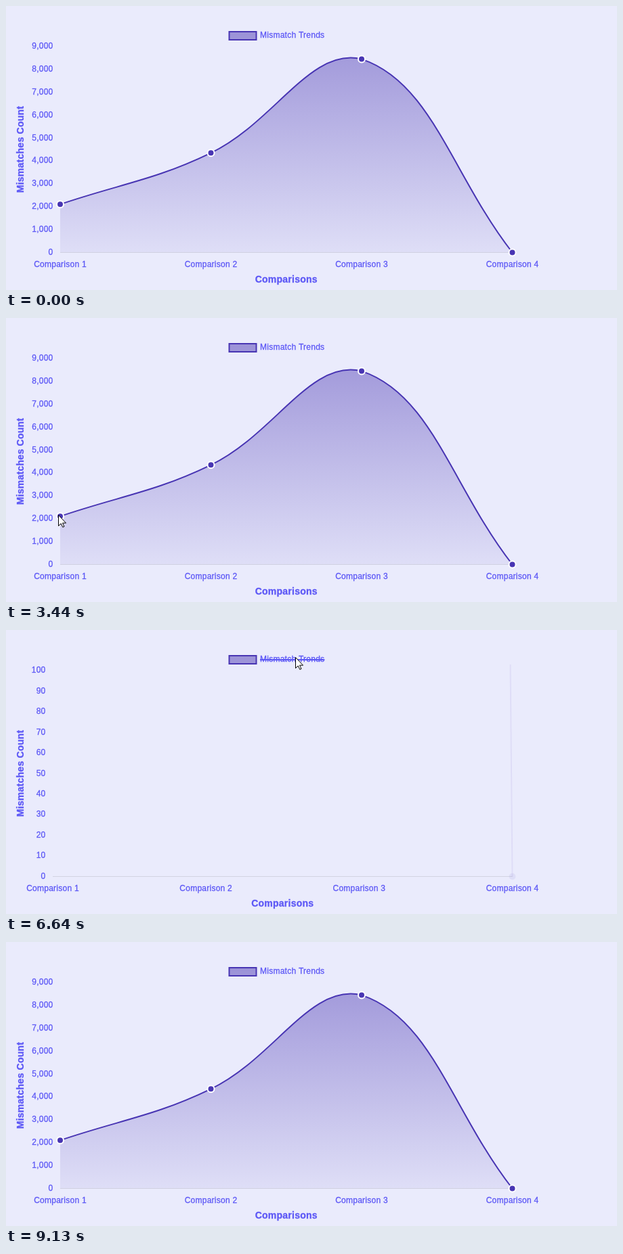
Recreate the animation shown at these times as an HTML page with a canvas. Size 902 by 420 pixels, loop 9740 ms.

```html
<!DOCTYPE html>
<html lang="en">
<head>
<meta charset="utf-8">
<title>Mismatch Trends</title>
<style>
  html, body { margin: 0; width: 100%; height: 100%; overflow: hidden; background: #eaebfc; }
  canvas { display: block; }
</style>
</head>
<body>
<canvas id="stage" width="902" height="420"></canvas>
<script>
const ctx = document.getElementById('stage').getContext('2d');
const LOOP = 9740;
const BACKGROUND = '#eaebfc', INK = '#5d58f6', LINE = '#4835b3';
const TOP = 60, BOTTOM = 364.5, RIGHT = 747.5;
const SERIES = 'Mismatch Trends';
const VALUES = [2105, 4350, 8450, 0];
const HIDE_AT = 6155, SHOW_AT = 7063, TOGGLE_MS = 1000;

const SHOWN = { left: 80, max: 9000, step: 1000 };
const HIDDEN = { left: 69, max: 100, step: 10 };

// Point index, time the hover starts, time it ends
const HOVERS = [[2, 1050, 1710], [1, 2490, 3000], [0, 3567, 3926], [3, 4915, 5476]];

// Pointer visits as [time, x, y]; it is off stage between the tracks
const TRACKS = [
  [[120, 794, 314], [560, 640, 175], [820, 545, 92], [1000, 521, 77], [1650, 521, 77],
   [2080, 331, 205], [2300, 301, 217], [2940, 301, 217], [3200, 165, 262], [3410, 77, 291],
   [3880, 77, 291], [4060, 713, 294], [4250, 786, 376], [4640, 743, 369], [5440, 743, 369],
   [5620, 545, 214], [5840, 427, 52], [5910, 427, 40], [8120, 427, 40],
   [8180, 440, 37], [8300, 457, 33]],
  [[8710, 600, 23], [8850, 680, 140], [9000, 800, 310], [9120, 819, 420]]
];

const clamp = (v, lo = 0, hi = 1) => Math.min(hi, Math.max(lo, v));
const lerp = (a, b, k) => a + (b - a) * k;
const easeOut = u => 1 - (1 - clamp(u)) ** 4;
const format = n => n.toLocaleString('en-US');

const fill = ctx.createLinearGradient(0, 20, 0, 420);
fill.addColorStop(0, 'rgba(70,50,176,.5)');
fill.addColorStop(1, 'rgba(70,50,176,0)');

function setFont(font) {
  ctx.font = `${font} "Liberation Sans", Arial, sans-serif`;
  ctx.letterSpacing = '0.25px';
}

// A hairline stroke gives the letters a slightly heavier weight
function text(string, x, y, align = 'center', font = '12px', color = INK) {
  setFont(font);
  ctx.textAlign = align;
  ctx.textBaseline = 'middle';
  ctx.fillStyle = ctx.strokeStyle = color;
  ctx.lineWidth = 0.3;
  ctx.fillText(string, x, y);
  ctx.strokeText(string, x, y);
  return ctx.measureText(string).width;
}

const columnX = (scale, i) => lerp(scale.left, RIGHT, i / 3);
const place = (scale, i) => ({
  x: columnX(scale, i),
  y: BOTTOM - VALUES[i] / scale.max * (BOTTOM - TOP)
});

function drawAxes(scale, hidden) {
  ctx.fillStyle = 'rgba(0,0,0,.1)';
  ctx.fillRect(scale.left, 364, RIGHT - scale.left, 1);
  for (let v = 0; v <= scale.max; v += scale.step) {
    text(format(v), scale.left - 10.5, lerp(BOTTOM, TOP, v / scale.max), 'right');
  }
  VALUES.forEach((_, i) => text(`Comparison ${i + 1}`, columnX(scale, i), 382.7));
  text('Comparisons', (scale.left + RIGHT) / 2, 405.5, 'center', 'bold 14px');
  ctx.save();
  ctx.translate(22.5, 212);
  ctx.rotate(-Math.PI / 2);
  text('Mismatches Count', 0, 0, 'center', 'bold 14px');
  ctx.restore();

  ctx.fillStyle = fill;
  ctx.fillRect(329.5, 38, 40, 12);
  ctx.strokeStyle = LINE;
  ctx.lineWidth = 2;
  ctx.strokeRect(329.5, 38, 40, 12);
  const width = text(SERIES, 375, 43.5, 'left');
  if (hidden) ctx.fillRect(375, 43, width, 2);
}

// Control points of a cardinal spline, kept inside the plot where neighbours are inside
function addControls(points) {
  const inside = p => p && p.y >= TOP - 0.5;
  points.forEach((p, i) => {
    const prev = points[i - 1], next = points[i + 1];
    const a = prev || p, b = next || p;
    const before = Math.hypot(p.x - a.x, p.y - a.y), after = Math.hypot(b.x - p.x, b.y - p.y);
    const control = (share, neighbour) => {
      const k = 0.4 * share / (before + after);
      const y = p.y + k * (b.y - a.y);
      return {
        x: p.x + k * (b.x - a.x),
        y: inside(p) && inside(neighbour) ? clamp(y, TOP, BOTTOM) : y
      };
    };
    p.into = control(-before, prev);
    p.out = control(after, next);
  });
}

function traceCurve(points) {
  points.forEach((p, i) => {
    if (!i) return ctx.lineTo(p.x, p.y);
    const from = points[i - 1].out;
    ctx.bezierCurveTo(from.x, from.y, p.into.x, p.into.y, p.x, p.y);
  });
}

function clipPlot(scale, margin, draw) {
  ctx.save();
  ctx.beginPath();
  ctx.rect(scale.left - margin, TOP - margin,
    RIGHT - scale.left + 2 * margin, BOTTOM - TOP + 2 * margin);
  ctx.clip();
  draw();
  ctx.restore();
}

function hoverAmount(i, t) {
  const hover = HOVERS.find(h => h[0] === i);
  return easeOut((t - hover[1]) / 400) - easeOut((t - hover[2]) / 400);
}

function drawSeries(scale, hidden, t) {
  const away = easeOut((t - HIDE_AT) / TOGGLE_MS) * (1 - easeOut((t - SHOW_AT) / TOGGLE_MS));
  const points = VALUES.map((_, i) => {
    const a = place(SHOWN, i), b = place(HIDDEN, i);
    return { x: lerp(a.x, b.x, away), y: lerp(a.y, b.y, away) };
  });
  addControls(points);

  if (!hidden) clipPlot(scale, 0, () => {
    ctx.beginPath();
    ctx.moveTo(points[0].x, BOTTOM);
    traceCurve(points);
    ctx.lineTo(points[3].x, BOTTOM);
    ctx.fillStyle = fill;
    ctx.fill();
  });

  ctx.globalAlpha = 1 - away;
  clipPlot(scale, 9, () => {
    ctx.beginPath();
    traceCurve(points);
    ctx.strokeStyle = LINE;
    ctx.lineWidth = 2;
    ctx.stroke();
  });
  points.forEach((p, i) => {
    if (p.y < TOP - 9) return;
    ctx.beginPath();
    ctx.arc(p.x, p.y, 5 + 2 * hoverAmount(i, t), 0, 7);
    ctx.fillStyle = LINE;
    ctx.fill();
    ctx.strokeStyle = '#fff';
    ctx.lineWidth = 2;
    ctx.stroke();
  });
  ctx.globalAlpha = 1;
}

function tooltipBox(i) {
  const label = `${SERIES}: ${format(VALUES[i])}`;
  setFont('12px');
  const width = 26 + ctx.measureText(label).width;
  const p = place(SHOWN, i), toRight = i < 2;
  return { label, width, toRight, x: toRight ? p.x + 7 : p.x - 7 - width, y: p.y - 23 };
}

function drawTooltip(t) {
  const n = HOVERS.findIndex(([, start, end]) => t >= start && t < end + 200);
  if (n < 0) return;
  const [index, start, end] = HOVERS[n];
  const box = tooltipBox(index);
  const from = n ? tooltipBox(HOVERS[n - 1][0]) : box;
  const k = easeOut((t - start) / 400);
  const x = lerp(from.x, box.x, k), y = lerp(from.y, box.y, k);
  const width = lerp(from.width, box.width, k);

  ctx.globalAlpha = clamp((t - start) / 200) * (1 - clamp((t - end) / 200));
  ctx.fillStyle = 'rgba(70,50,176,.8)';
  ctx.beginPath();
  ctx.roundRect(x, y, width, 46.4, 6);
  const edge = box.toRight ? x : x + width;
  ctx.moveTo(edge, y + 18);
  ctx.lineTo(edge + (box.toRight ? -5 : 5), y + 23);
  ctx.lineTo(edge, y + 28);
  ctx.fill();

  text(`Comparison ${index + 1}`, x + 6, y + 13.2, 'left', 'bold 12px');
  ctx.fillStyle = '#fff';
  ctx.fillRect(x + 5, y + 26.6, 14, 14);
  ctx.fillStyle = 'rgba(70,50,176,.75)';
  ctx.fillRect(x + 7, y + 28.6, 10, 10);
  text(box.label, x + 20, y + 33.6, 'left', '12px', '#fff');
  ctx.globalAlpha = 1;
}

const arrow = new Path2D('M.5 .5V16.5L4.2 13L6.8 18.4L9 17.4L6.5 12.2H11.5Z');

function drawPointer(t) {
  const track = TRACKS.find(keys => t >= keys[0][0] && t < keys[keys.length - 1][0]);
  if (!track) return;
  const i = track.findIndex(key => key[0] > t);
  const [t0, x0, y0] = track[i - 1], [t1, x1, y1] = track[i];
  const k = (t - t0) / (t1 - t0);
  ctx.save();
  ctx.translate(Math.round(lerp(x0, x1, k)), Math.round(lerp(y0, y1, k)));
  ctx.fillStyle = '#fff';
  ctx.fill(arrow);
  ctx.strokeStyle = '#000';
  ctx.lineWidth = 1;
  ctx.stroke(arrow);
  ctx.restore();
}

function render(now) {
  const t = now % LOOP;
  const hidden = t >= HIDE_AT && t < SHOW_AT;
  const scale = hidden ? HIDDEN : SHOWN;
  ctx.fillStyle = BACKGROUND;
  ctx.fillRect(0, 0, 902, 420);
  drawAxes(scale, hidden);
  drawSeries(scale, hidden, t);
  drawTooltip(t);
  drawPointer(t);
}

const started = performance.now();
function tick() {
  render(performance.now() - started);
  requestAnimationFrame(tick);
}
tick();
</script>
</body>
</html>
```
